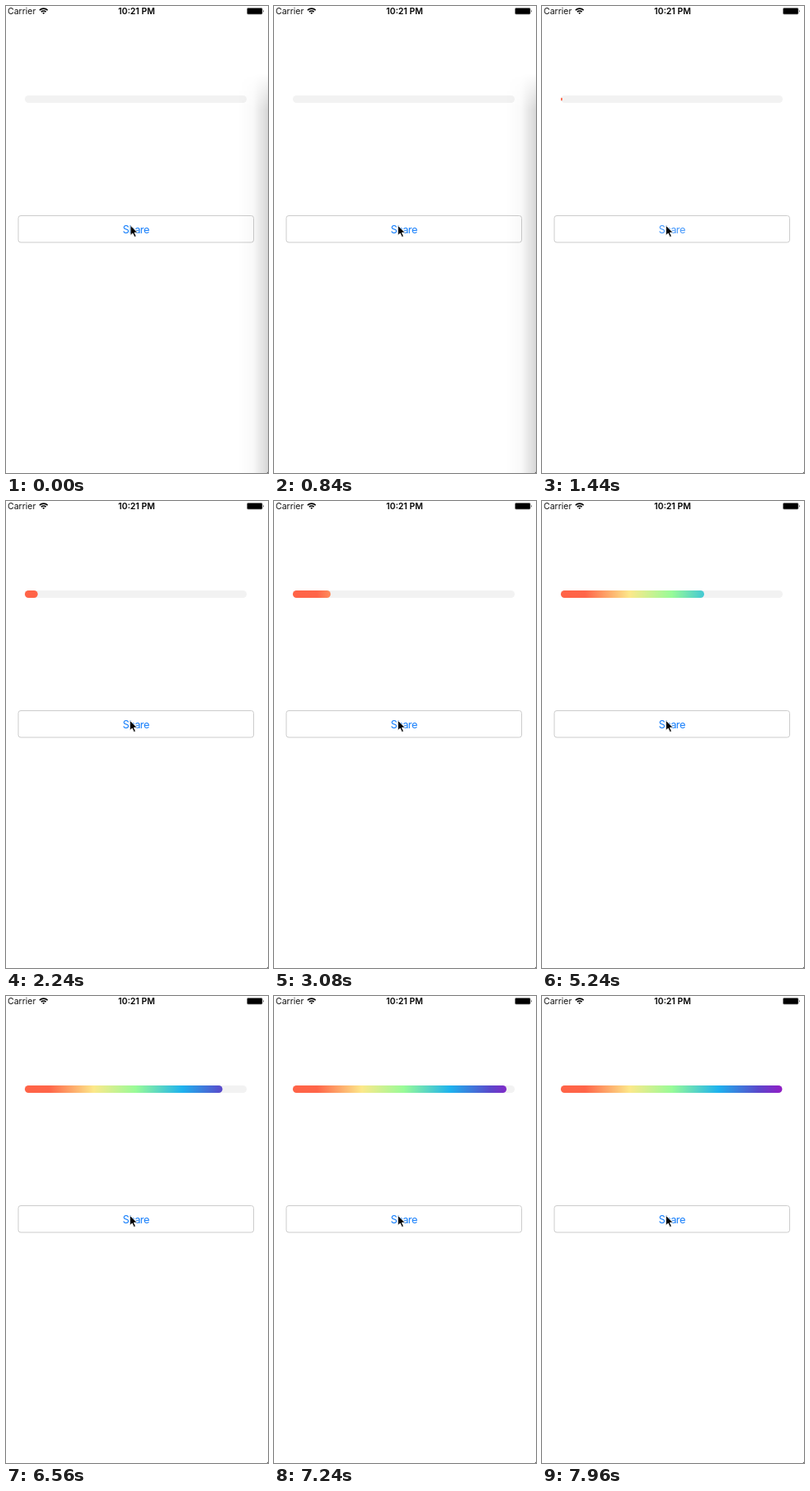
These frames come from a looping animation (320 px wide and 569 px high, 8000 ms). An HTML page:

```html
<!DOCTYPE html>
<html lang="en">
<head>
<meta charset="utf-8">
<title>Progress bar</title>
<style>
  html, body { margin: 0; width: 100%; height: 100%; overflow: hidden; background: #fff; }
  svg { display: block; width: 100%; height: 100%; }
  text { font-family: Inter, Roboto, sans-serif; }
</style>
</head>
<body>
<svg viewBox="0 0 320 569">
  <defs>
    <linearGradient id="rainbow" gradientUnits="userSpaceOnUse" x1="23" x2="294">
      <stop offset="0" stop-color="#ff6347"/>
      <stop offset=".11" stop-color="#ff6549"/>
      <stop offset=".31" stop-color="#fce88a"/>
      <stop offset=".5" stop-color="#98fb98"/>
      <stop offset=".71" stop-color="#1eb2ee"/>
      <stop offset=".89" stop-color="#5b48cb"/>
      <stop offset="1" stop-color="#941bc6"/>
    </linearGradient>
    <linearGradient id="shade">
      <stop offset="0" stop-color="#000" stop-opacity="0"/>
      <stop offset=".5" stop-color="#000" stop-opacity=".025"/>
      <stop offset="1" stop-color="#000" stop-opacity=".16"/>
    </linearGradient>
    <linearGradient id="fade" x2="0" y2="1">
      <stop offset="0" stop-color="#000"/>
      <stop offset=".09" stop-color="#fff"/>
    </linearGradient>
    <mask id="shadeMask"><rect x="284" y="82" width="36" height="487" fill="url(#fade)"/></mask>
  </defs>
  <rect width="320" height="569" fill="#fff"/>

  <text x="2" y="10" font-size="10.5" fill="#111">Carrier</text>
  <g fill="none" stroke="#000" stroke-width="1.6">
    <path d="M41 5.1a7 7 0 0 1 9.8 0M43 7.2a4.2 4.2 0 0 1 5.8 0"/>
    <path d="M44.5 8.4a2 2 0 0 1 2.8 0L45.9 10Z" fill="#000" stroke="none"/>
  </g>
  <text x="159.5" y="10" font-size="10.5" font-weight="600" text-anchor="middle">10:21 PM</text>
  <rect x="294.5" y="2.5" width="18.5" height="7.5" rx="1.3" fill="#000" stroke="#777" stroke-width=".7"/>
  <path d="M314 4.8q1.4 1.4 0 2.9Z"/>

  <rect x="23" y="109" width="271" height="9" rx="4.5" fill="#f2f2f2"/>
  <rect id="bar" x="23" fill="url(#rainbow)"/>

  <rect x="15" y="255.5" width="287.5" height="32.5" rx="3" fill="#fff" stroke="#ccc"/>
  <text id="label" x="158.7" y="276.5" font-size="12.8" letter-spacing="-.55" text-anchor="middle" fill="#157efb">Share</text>

  <rect id="shadow" x="284" y="82" width="36" height="487" fill="url(#shade)" mask="url(#shadeMask)"/>
  <path d="M320 567.5V569H318.5Z" fill="#555"/>
  <path id="cursor" d="M0 0V12.2L2.8 9.6L5 14.2L7 13.2L4.9 8.8H8.6Z" stroke="#fff" stroke-width=".8"/>
</svg>
<script>
const LOOP = 8000, PRESS = 920, RELEASE = 1020, FILL_TIME = 7200, FADE_TIME = 560;
const $ = id => document.getElementById(id);
const bar = $('bar'), label = $('label'), shadow = $('shadow'), cursor = $('cursor');
const clamp = v => Math.min(1, Math.max(0, v));

function set(el, attrs) {
  for (const name in attrs) el.setAttribute(name, attrs[name]);
}

// cubic-bezier(.42, 0, .58, 1), solved for x by bisection
function easeInOut(x) {
  let lo = 0, hi = 1, s = .5;
  for (let i = 0; i < 24; i++) {
    s = (lo + hi) / 2;
    const bx = 3 * (1 - s) * (1 - s) * s * .42 + 3 * (1 - s) * s * s * .58 + s * s * s;
    if (bx < x) lo = s; else hi = s;
  }
  return s * s * (3 - 2 * s);
}

function labelOpacity(t) {
  if (t < PRESS) return 1;
  return .2 + .8 * clamp((t - RELEASE) / FADE_TIME);
}

function draw(t) {
  const p = clamp((t - RELEASE) / FILL_TIME);
  const width = p > 0 ? 271 * easeInOut(p) : 0;
  const height = Math.min(9, width * 2);
  set(bar, { width, height, y: 113.5 - height / 2, rx: Math.min(4.5, width / 2) });
  set(label, { opacity: labelOpacity(t) });
  set(shadow, { visibility: t < PRESS ? 'visible' : 'hidden' });
  set(cursor, { transform: `translate(${t < 400 ? 152 : 151.3} 267.3)` });
}

const start = performance.now();
function tick() {
  draw((performance.now() - start) % LOOP);
  requestAnimationFrame(tick);
}
draw(0);
requestAnimationFrame(tick);
</script>
</body>
</html>
```
